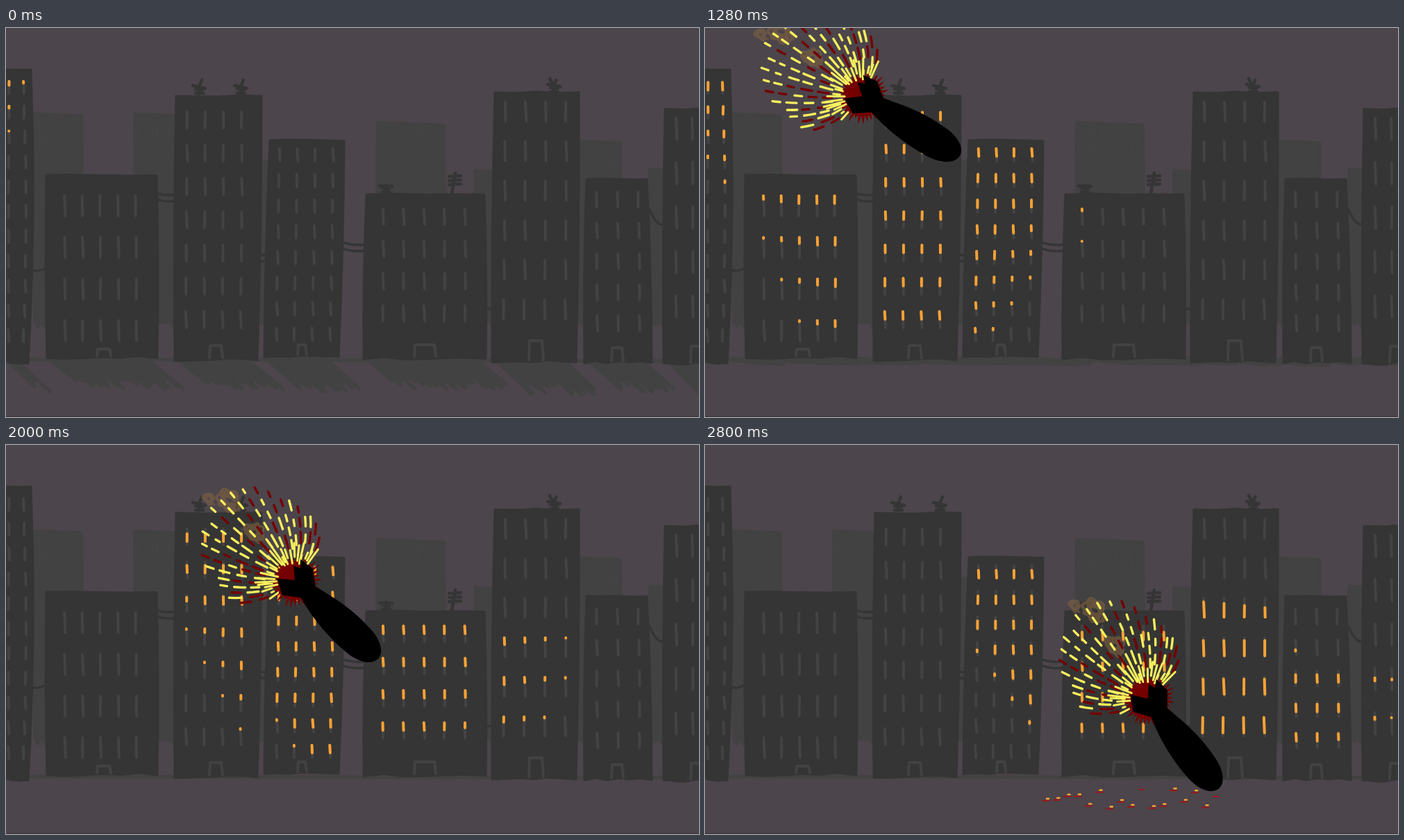
An HTML page with a canvas that plays this animation: 998 by 561 pixels, repeating every 2.88 s.

```html
<!DOCTYPE html>
<html lang="en">
<head>
<meta charset="utf-8">
<title>Night city</title>
<style>
  html, body { margin: 0; width: 100%; height: 100%; overflow: hidden; background: #4c454b; }
  canvas { display: block; }
</style>
</head>
<body>
<canvas id="stage" width="998" height="561"></canvas>
<script>
const ctx = document.getElementById('stage').getContext('2d');
const STEP = 80, STEPS = 36;
const SKY = '#4c454b', WALL = '#353535', GREY = '#424242', LIGHT = '#fba235',
      YELLOW = '#f8f05c', RED = '#740000', SMOKE = 'rgba(128,98,64,.6)';

const hash = n => { const s = Math.sin(n * 127.1 + 3.7) * 43758.5453; return s - Math.floor(s); };
const clamp = (v, lo, hi) => Math.min(hi, Math.max(lo, v));
const mix = (a, b, f) => a + (b - a) * f;

function stroke(path, color, width) {
  ctx.strokeStyle = color;
  ctx.lineWidth = width;
  ctx.stroke(path);
}
function fill(path, color) {
  ctx.fillStyle = color;
  ctx.fill(path);
}
function line(path, x1, y1, x2, y2) {
  path.moveTo(x1, y1);
  path.lineTo(x2, y2);
}

// top/base: left and right edge; cols, rows: first position, gap, count.
// Lights spread from row "heart" at step "on" and die back towards the top right until "off".
const houses = [
  { top: [-4, 36], base: [-4, 32], y: [60, 484], bow: 10, cols: [4.5, 20, 2], rows: [77, 35.8, 11],
    on: -2, off: 21.2, fade: 1.05 },
  { top: [58, 217], base: [59, 218], y: [212, 476], cols: [84, 25.5, 5], rows: [242, 60, 4], door: [131, 20, 10],
    on: 1, off: 23, fade: 1.3 },
  { top: [245, 368], base: [243, 362], y: [98, 479], cols: [261, 26, 4], rows: [121, 48, 7], door: [293, 19, 18],
    on: .8, off: 35, fade: 1.6 },
  { top: [380, 487], base: [372, 479], y: [162, 474], cols: [394, 25.5, 4], rows: [174, 37, 8], door: [420, 13, 14],
    on: 7, off: 57, fade: 3.5 },
  { top: [519, 689], base: [515, 691], y: [240, 477], cols: [543, 29.3, 5], rows: [261, 46.5, 4], door: [588, 31, 17],
    on: 15 },
  { top: [704, 825], base: [700, 821], y: [93, 482], cols: [719, 29, 4], rows: [107, 57, 6], door: [753, 21, 28],
    on: 21, heart: 3.8, lit: 22 },
  { top: [836, 923], base: [833, 930], y: [218, 483], cols: [850, 30, 3], rows: [237, 44.5, 5], door: [872, 17, 19],
    on: 28.5, heart: 2.8 },
  { top: [949, 1006], base: [947, 1006], y: [117, 485], cols: [965, 23, 2], rows: [130, 64, 5], door: [986, 17, 23],
    on: 33.3, heart: 3.5 }
];

// Left edge, width, top
const far = [[37, 74, 125], [183, 63, 125], [362, 20, 192], [533, 100, 138], [673, 33, 206], [822, 65, 164], [925, 25, 204]];

function drawFar() {
  far.forEach(([l, w, top], k) => {
    const slope = w / 50, bottom = 424, block = new Path2D(), slits = new Path2D();
    block.moveTo(l + 2, top - slope);
    block.lineTo(l + w - 2, top + slope);
    for (let x = l + w, n = 0; x >= l; x -= 5, n++) block.lineTo(x, bottom + (n % 2) * 9 * hash(k * 40 + n));
    block.closePath();
    for (let x = l + 5, n = 0; w > 50 && x < l + w - 4; x += 6, n++) {
      const y = top + 4 + hash(n) * 5;
      line(slits, x, y, x - 1, y + 8 + hash(n + k * 9) * 45);
    }
    fill(block, GREY);
    stroke(block, GREY, 4);
    stroke(slits, 'rgba(76,69,75,.6)', 1.3);
  });
}

function drawShade(i) {
  const d = Math.max(0, 1 - i / 19.5), path = new Path2D();
  if (d > .05) houses.forEach(({ base: [l, r] }, k) => {
    const drop = 44 + 14 * hash(k + 4);
    for (let x = l; x < r - 18; x += 4.5) {
      const h = .62 + .38 * hash(x);
      line(path, x, 474, x + (123 - 65 * d) * h, 477 + drop * d * h);
    }
  });
  line(path, 0, 478, 998, 480);
  stroke(path, GREY, 5);
}

function drawWires() {
  const path = new Path2D();
  const wire = (x1, y1, x2, y2) => {
    path.moveTo(x1, y1);
    path.quadraticCurveTo((x1 + x2) / 2, Math.max(y1, y2) + 3, x2, y2);
  };
  wire(36, 349, 56, 347);
  wire(690, 403, 702, 404);
  wire(927, 262, 947, 283);
  for (const dy of [0, 9]) {
    wire(217, 238 + dy, 244, 240 + dy);
    wire(364, 326 + dy, 376, 326 + dy);
    wire(482, 308 + dy, 518, 312 + dy);
  }
  stroke(path, WALL, 3.4);
}

function drawAerials() {
  const path = new Path2D();
  const dish = (x, y, tilt) => {
    line(path, x - 9, y - tilt, x + 9, y + tilt);
    line(path, x - 5, y + 3, x + 5, y + 4);
    line(path, x, y, x + tilt * 2, y - tilt * 5);
    line(path, x, y, x, y + 10);
    line(path, x - 5, y + 9, x + 6, y + 9);
  };
  dish(278, 85, 2);
  dish(338, 85, 2);
  dish(789, 83, 1.6);
  line(path, 788, 82, 783, 73);
  dish(547, 228, .3);
  line(path, 647, 209, 642, 239);
  for (let y = 213; y < 230; y += 6) line(path, 638, y + 1, 655, y);
  stroke(path, WALL, 4.6);
}

function wallPath({ top, base, y: [y0, y1], bow = 3 }, k) {
  const path = new Path2D(), mid = (y0 + y1) / 2;
  path.moveTo(top[0], y0);
  for (let n = 1; n <= 4; n++) path.lineTo(mix(top[0], top[1], n / 4), y0 + hash(k * 9 + n) * 2 - 1);
  path.quadraticCurveTo((top[1] + base[1]) / 2 + bow, mid, base[1], y1);
  for (let n = 1; n <= 6; n++) path.lineTo(mix(base[1], base[0], n / 6), y1 + hash(k * 7 + n) * 4 - 3);
  path.quadraticCurveTo((top[0] + base[0]) / 2 - bow, mid, top[0], y0);
  path.closePath();
  return path;
}

function drawHouse(h, k, i, bombY) {
  const { top, base, y: [y0, y1], cols, rows, door, heart = 0, bow = 3, fade = 0, off = STEPS * 2 } = h;
  const wall = wallPath(h, k), frame = new Path2D(), dark = new Path2D(), glow = new Path2D();
  fill(wall, WALL);
  stroke(wall, WALL, 3);
  if (door) {
    const [x, w, high] = door, foot = y1 - 3;
    frame.moveTo(x, foot);
    frame.lineTo(x + 1, foot - high);
    frame.lineTo(x + w - 2, foot - high);
    frame.lineTo(x + w, foot);
    stroke(frame, GREY, 4);
  }

  const pane = rows[1] * .48, last = cols[2] - 1;
  const lean = (top[0] + top[1] - base[0] - base[1]) * -.35;
  for (let r = 0; r < rows[2]; r++) for (let c = 0; c <= last; c++) {
    const seed = k * 100 + r * 7 + c, y = rows[0] + r * rows[1], f = (y - y0) / (y1 - y0);
    const x = cols[0] + c * cols[1] + lean * f + c / last * bow / 2 * Math.sin(Math.PI * f);
    const tilt = hash(seed) * 2 - .5;
    line(dark, x, y, x + tilt, y + pane);

    const above = Math.max(0, heart - r), below = Math.max(0, r - heart);
    const start = h.on + above ** 3 + below + 1.1 * c;
    const end = off - fade * (r + last - c);
    if (i < start || i >= end) continue;
    const len = clamp(Math.min(i - start, end - i) * 2.8, .1, h.lit || 11);
    // The gleam slides down the pane as the bomb sinks below it.
    const slide = y + clamp((bombY - y - 55) / 220, 0, 1) * Math.max(0, pane - len);
    line(glow, x, slide, x + tilt * len / pane, slide + len);
  }
  stroke(dark, '#434343', 4);
  stroke(glow, LIGHT, 4);
}

// Step, nose x, nose y, pitch in degrees
const route = [[0, -24, -12, 19], [12, 288, 133, 26], [19, 417, 221, 36.5],
               [25, 531, 306, 44], [29, 613, 382, 46.5], [35, 735, 493, 52.5]];
function poseAt(i) {
  const k = Math.max(1, route.findIndex(p => p[0] >= i)), a = route[k - 1], b = route[k];
  const [, x, y, turn] = a.map((v, n) => mix(v, b[n], (i - a[0]) / (b[0] - a[0])));
  return { x, y, turn: turn * Math.PI / 180 };
}

// In bomb space the nose is at 0,0 and the tail points to negative x.
const body = new Path2D('M5-2C5-14-10-23-30-25C-70-28-98-22-132-14L-153-30-175-27-166-18-176-14-160 0' +
  '-180 16-158 28-136 12C-105 22-65 26-30 23C-8 20 5 10 5-2Z');

function drawSmoke() {
  const path = new Path2D();
  const scribble = (cx, cy, size, turns) => {
    const at = n => {
      const a = n * 2.2, r = size * (.35 + .65 * hash(n + size));
      return [cx + Math.cos(a) * r * 1.2, cy + Math.sin(a) * r];
    };
    path.moveTo(...at(0));
    for (let n = 1; n < turns * 3; n++) {
      const [x, y] = at(n), [nx, ny] = at(n + 1);
      path.quadraticCurveTo(x, y, (x + nx) / 2, (y + ny) / 2);
    }
  };
  scribble(-250, -8, 24, 8);
  scribble(-308, -18, 28, 10);
  scribble(-332, 2, 14, 4);
  stroke(path, SMOKE, 3);
}

function drawBlaze() {
  const CORE = -159, trail = { [RED]: new Path2D(), [YELLOW]: new Path2D() };
  const polar = (a, r) => [CORE - Math.cos(a) * r, -Math.sin(a) * r];

  // Sparks: dashed rays that fan out of the tail and close in slightly at the rim.
  const RAYS = 23;
  for (let k = 0; k < RAYS; k++) {
    const a = (k / (RAYS - 1) * 2 - 1) * 1.3 + .06;
    const rim = 76 + 84 * Math.cos(a * 1.1) ** 2;
    const at = r => polar(a * (1.2 - .25 * r / rim), r);
    for (let r = 44 + hash(k) * 14, n = 0; r < rim; n++) {
      const seed = k * 11 + n, len = mix(19, 7, r / 160) * (.7 + .6 * hash(seed));
      const path = trail[hash(seed + 5) < .38 ? RED : YELLOW];
      path.moveTo(...at(r));
      path.lineTo(...at(r + len / 2));
      path.lineTo(...at(r + len));
      r += len + 7 + 7 * hash(seed + 2);
    }
  }
  stroke(trail[RED], RED, 3.4);
  stroke(trail[YELLOW], YELLOW, 3.4);

  const blob = new Path2D(), rays = new Path2D();
  for (let n = 0; n < 70; n++) blob.lineTo(...polar(n / 35 * Math.PI, n % 2 ? 27 : 33 + hash(n) * 9));
  fill(blob, RED);
  for (let k = 0; k < 25; k++) {
    const a = (k / 24 * 2 - 1) * 1.4 + hash(k) * .1;
    rays.moveTo(...polar(a, 25 + 11 * hash(k + 30)));
    rays.lineTo(...polar(a, 38 + 20 * hash(k + 7)));
  }
  stroke(rays, YELLOW, 3);
}

function drawEmbers(i) {
  const red = new Path2D(), tips = new Path2D();
  for (let k = 0; k < 17; k++) {
    const age = i - 28 - hash(k + 3) * 6;
    if (age < 0) continue;
    const x = 491 + k * 15.3, y = 512 + (hash(k * 3 + 1) - .5) * 31, w = Math.min(5, 2 + age);
    line(red, x - w, y, x + w, y);
    if (age > 2) line(tips, x + 1, y - 3, x + 4, y - 3);
  }
  stroke(red, '#98191b', 2);
  stroke(tips, LIGHT, 2.6);
}

function draw(i) {
  const pose = poseAt(i);
  ctx.lineCap = ctx.lineJoin = 'round';
  ctx.fillStyle = SKY;
  ctx.fillRect(0, 0, 998, 561);
  drawFar();
  drawShade(i);
  drawWires();
  drawAerials();
  houses.forEach((h, k) => drawHouse(h, k, i, pose.y));
  drawEmbers(i);
  if (i) {
    ctx.save();
    ctx.translate(pose.x, pose.y);
    ctx.rotate(pose.turn);
    drawSmoke();
    drawBlaze();
    fill(body, '#000');
    ctx.restore();
  }
  ctx.fillStyle = '#37323a';
  ctx.fillRect(0, 560, 998, 1);
}

let shown = -1;
function tick() {
  const i = Math.floor(performance.now() / STEP) % STEPS;
  if (i !== shown) draw(shown = i);
  requestAnimationFrame(tick);
}
tick();
</script>
</body>
</html>
```
